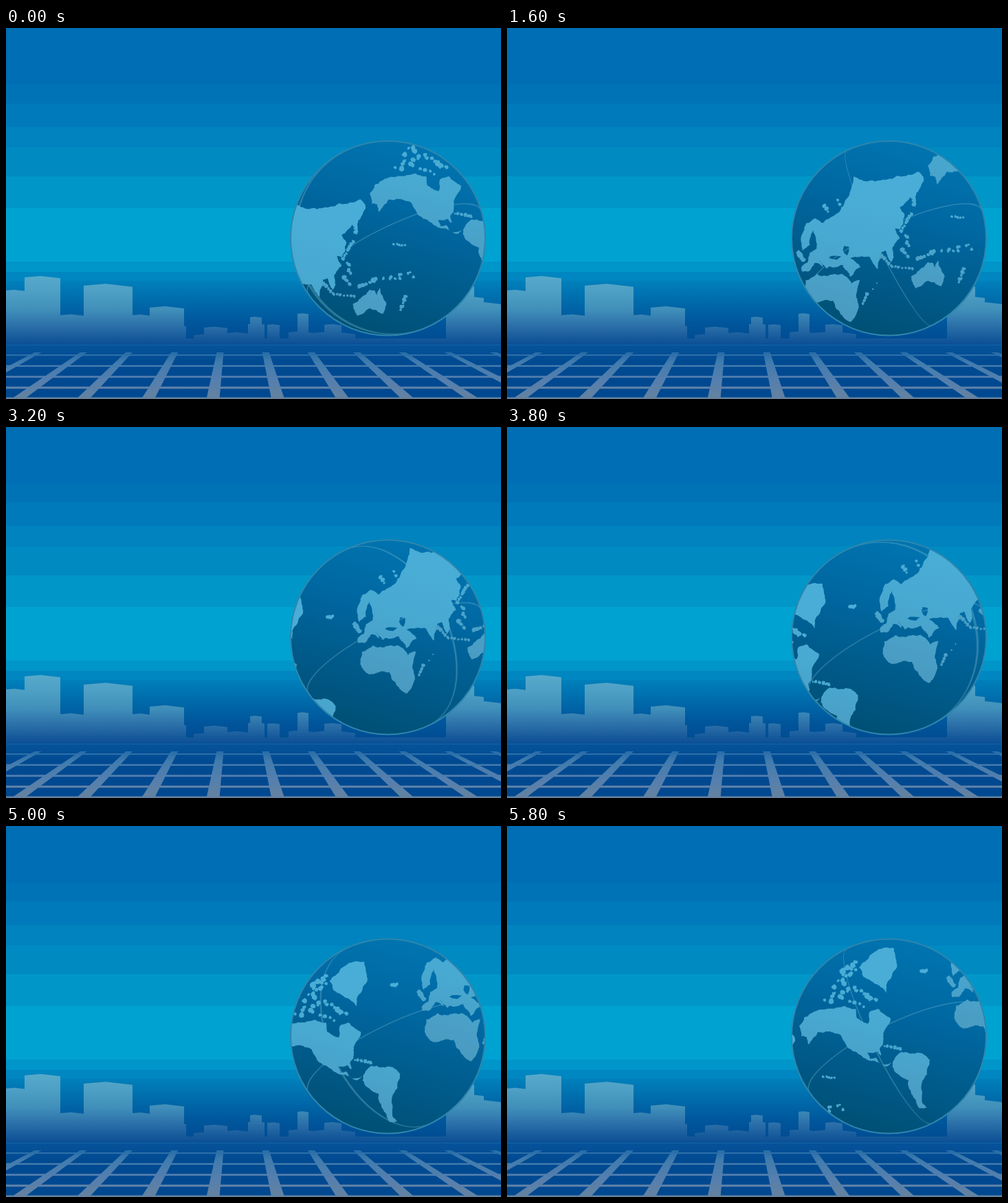
Write an HTML page with a canvas that moves like this. It is 720x540 px and loops after 6 s.

```html
<!DOCTYPE html>
<html lang="en">
<head>
<meta charset="utf-8">
<title>Turning globe</title>
<style>
html, body { margin: 0; width: 100%; height: 100%; overflow: hidden; background: #006eb4; }
canvas { display: block; width: 720px; height: 540px; }
</style>
</head>
<body>
<canvas id="stage" width="720" height="540"></canvas>
<script>
const ctx = document.getElementById('stage').getContext('2d');
const LOOP = 6000, TICK = 200;
const GLOBE = { x: 555.5, y: 306, r: 141.5, tilt: -0.452 };
const STEP = { x: 10.4, y: -5.03 };
const WRAP = 39; // steps for one full turn of the map

let seed = 7;
const rnd = () => (seed = (seed * 16807) % 2147483647) / 2147483647;
const jitter = size => (rnd() * 2 - 1) * size;

function gradient(x0, y0, x1, y1, ...colors) {
  const g = ctx.createLinearGradient(x0, y0, x1, y1);
  colors.forEach((c, i) => g.addColorStop(i / (colors.length - 1), c));
  return g;
}

// Ragged edge from a to b by midpoint displacement
function ragged(path, a, b) {
  const dx = b[0] - a[0], dy = b[1] - a[1], len = Math.hypot(dx, dy);
  if (len < 4) return path.lineTo(...b);
  const off = jitter(Math.min(0.13, 1.8 / len));
  const mid = [(a[0] + b[0]) / 2 - dy * off, (a[1] + b[1]) / 2 + dx * off];
  ragged(path, a, mid);
  ragged(path, mid, b);
}

function coast(path, text) {
  const pts = text.split(' ').map(p => p.split(',').map(Number));
  path.moveTo(...pts[0]);
  pts.forEach((p, i) => ragged(path, p, pts[(i + 1) % pts.length]));
  path.closePath();
}

function islet(path, x, y, rx, ry = rx) {
  const turn = rnd() * 6;
  for (let i = 0; i < 7; i++) {
    const a = turn + i * 2 * Math.PI / 7, d = 1 + jitter(0.3);
    path[i ? 'lineTo' : 'moveTo'](x + rx * d * Math.cos(a), y + ry * d * Math.sin(a));
  }
  path.closePath();
}

// Islands strewn along a line
function chain(path, x0, y0, x1, y1, count, size, spread = 0.7) {
  for (let i = 0; i < count; i++) {
    const f = i / (count - 1);
    islet(path, x0 + (x1 - x0) * f + jitter(spread), y0 + (y1 - y0) * f + jitter(spread),
      size * (1 + jitter(0.35)));
  }
}

// Land masses, each given at the step where its coordinates hold
const lands = [];
function land(step, outline, ...chains) {
  const path = new Path2D(), isles = new Path2D();
  if (outline) coast(path, outline);
  chains.forEach(c => chain(isles, ...c));
  lands.push({ step, path, isles });
  return path;
}

const eurasia = land(12,
  '470,334 471,326 479,321 482,307 492,301 491,289 487,274 482,296 472,304 469,290 477,264 490,257 500,264 ' +
  '519,252 530,240 540,220 546,196 562,203 592,201 610,195 640,189 648,202 637,220 635,241 628,226 ' +
  '613,241 620,252 614,274 606,272 613,286 602,300 604,314 600,321 592,304 586,306 581,331 569,313 ' +
  '548,313 541,315 556,328 541,342 530,325 510,327 506,330 495,318 502,328 489,322 481,334',
  [466, 306, 472, 318, 4, 3.2], [522, 230, 529, 242, 3, 2.6], [504, 238, 508, 247, 3, 2.6]);
islet(eurasia, 519, 314, 8, 3); // inland seas
islet(eurasia, 535, 303, 4, 7);

land(12, // Africa
  '476,347 493,338 506,341 529,338 543,352 555,347 550,366 553,382 548,400 541,408 526,395 516,377 486,380 474,366',
  [565, 367, 559, 381, 4, 2.3], [578, 351, 564, 373, 4, 1.3, 2]);

land(29, // North America
  '425,291 432,279 452,268 490,262 507,266 509,280 525,288 527,271 540,266 558,280 548,300 547,318 542,324 544,334 ' +
  '538,328 524,330 528,339 536,337 545,347 559,344 551,350 520,338 503,328 493,318 486,305 470,299 452,300 438,318 436,307 428,306',
  [549, 320, 573, 324, 6, 2.2], [466, 254, 500, 240, 9, 3.6, 5], [480, 232, 506, 206, 10, 3.4, 4.5],
  [490, 212, 508, 197, 4, 4, 1.5], [505, 235, 535, 254, 8, 4, 2], [500, 254, 520, 262, 4, 2.6, 2]);

land(29, // Greenland
  '512,206 528,188 541,179 563,178 567,206 553,228 552,243 541,232 518,219',
  [603, 211, 610, 211, 3, 3]);

land(29, // South America
  '561,344 573,329 604,331 615,341 611,361 603,375 604,403 611,410 600,411 588,390 584,370 563,356');

land(4, // Australia and the Pacific
  '546,382 570,361 578,362 581,369 585,358 595,382 590,396 570,388 553,399',
  [622, 371, 616, 390, 5, 2.6], [556, 356, 580, 346, 6, 3.4, 1], [533, 343, 541, 352, 3, 3.6],
  [503, 352, 518, 366, 5, 3], [518, 367, 548, 370, 7, 1.8], [538, 320, 543, 336, 4, 2.4, 2],
  [546, 291, 531, 316, 7, 2.8], [547, 262, 550, 277, 4, 2.4], [588, 348, 634, 338, 11, 2, 5],
  [606, 294, 622, 296, 5, 1.8]);

function drawSky() {
  [[0, '#006eb4'], [82, '#0073b7'], [110, '#007aba'], [144, '#0083be'], [174, '#008ac2'],
   [216, '#0097c8'], [262, '#00a2d2'], [340, '#0096c9'], [355, '#0086c0']].forEach(([y, color]) => {
    ctx.fillStyle = color;
    ctx.fillRect(0, y, 720, 540 - y);
  });
  ctx.fillStyle = gradient(0, 368, 0, 462, '#0080bb', '#006aaa', '#00559b', '#004a90');
  ctx.fillRect(0, 368, 720, 172);
}

// Blocks as left, width, roof height
const blocks = [
  [0, 27, 382], [27, 52, 363], [79, 34, 418], [113, 71, 375], [184, 25, 418], [209, 50, 407],
  [259, 3, 434], [273, 50, 447], [288, 34, 436], [322, 30, 444], [352, 24, 431], [355, 17, 421],
  [380, 18, 432], [411, 35, 443], [424, 16, 416], [446, 62, 444], [463, 25, 432],
  [640, 80, 400], [655, 40, 392], [660, 21, 376]
];

function drawCity() {
  ctx.fillStyle = gradient(0, 360, 0, 460, '#58aacb', '#4d9fc4', '#408fba', '#2a6ea8', '#0c4f95');
  ctx.beginPath();
  for (const [x, w, y] of blocks) {
    ctx.moveTo(x, 460);
    ctx.lineTo(x, y);
    ctx.lineTo(x + w * 0.45, y - w / 25);
    ctx.lineTo(x + w, y + w / 40);
    ctx.lineTo(x + w, 460);
  }
  ctx.rect(0, 452, 720, 8);
  ctx.fill();
}

function drawGround() {
  ctx.fillStyle = gradient(0, 460, 0, 540, '#07539a', '#004a92', '#004991', '#004890');
  ctx.fillRect(0, 460, 720, 80);
  ctx.fillStyle = gradient(0, 460, 0, 540, '#1260a3', '#417cae', '#557fae', '#64829f');
  ctx.fillRect(0, 461, 720, 1);
  for (let i = 0; i < 5; i++) ctx.fillRect(0, 537.5 - 15.6 * i, 720, 3.6 - 0.4 * i);
  for (let i = -6; i <= 7; i++) {
    const low = 301 + 94.6 * i, high = 311.5 + 66.2 * i;
    ctx.beginPath();
    ctx.moveTo(high - 5, 472);
    ctx.lineTo(high + 5, 472);
    ctx.lineTo(low + 9.5, 540);
    ctx.lineTo(low - 9.5, 540);
    ctx.fill();
  }
}

// Half width of the moving meridian, negative on the left
function meridian(t) {
  const w = t < 4.2 ? -133 + 73.5 * t - 1.4 * t * t : -143 + 73 * (t - 4.2);
  return Math.max(-140, Math.min(140, w));
}

function drawLines(t) {
  const w = meridian(t), a = Math.abs(w), r = GLOBE.r, half = 0.6 + a * 0.01;
  const side = w < 0 ? [Math.PI / 2, Math.PI * 1.5] : [-Math.PI / 2, Math.PI / 2];
  ctx.save();
  ctx.translate(GLOBE.x, GLOBE.y);
  ctx.rotate(GLOBE.tilt);
  ctx.strokeStyle = ctx.fillStyle = 'rgba(105,175,200,.4)';
  ctx.lineWidth = 1.5;
  ctx.beginPath();
  ctx.ellipse(0, 22, 139.8, 38, 0, Math.PI, 2 * Math.PI);
  ctx.stroke();
  ctx.beginPath();
  ctx.ellipse(0, 0, a + half, r, 0, ...side);
  ctx.ellipse(0, 0, Math.max(0, a - half), r - 1, 0, side[1], side[0], true);
  ctx.fill();
  ctx.restore();
}

function drawLands(step) {
  for (const { step: home, path, isles } of lands) {
    for (let lap = -1; lap <= 1; lap++) {
      const n = step - home + lap * WRAP;
      ctx.save();
      ctx.translate(n * STEP.x, n * STEP.y);
      ctx.fill(path, 'evenodd');
      ctx.fill(isles);
      ctx.restore();
    }
  }
}

function drawGlobe(step) {
  const { x, y, r } = GLOBE;
  const slope = (...colors) => gradient(x + 40, y - r, x - 40, y + r, ...colors);
  ctx.save();
  ctx.beginPath();
  ctx.arc(x, y, r, 0, 2 * Math.PI);
  ctx.clip();
  ctx.fillStyle = slope('#0075b1', '#0068a2', '#005b8b', '#004f74');
  ctx.fillRect(x - r, y - r, 2 * r, 2 * r);
  drawLines(step * TICK / 1000);
  ctx.fillStyle = slope('#49aed8', '#49add6', '#48a8d0', '#4a9dc4', '#4a96ba');
  drawLands(step);
  ctx.restore();
  ctx.beginPath();
  ctx.arc(x, y, r, 0, 2 * Math.PI);
  ctx.strokeStyle = '#2f86ad';
  ctx.lineWidth = 2;
  ctx.stroke();
}

let shown = -1;
function frame() {
  const step = Math.floor(performance.now() % LOOP / TICK);
  if (step !== shown) {
    shown = step;
    drawSky();
    drawCity();
    drawGround();
    drawGlobe(step);
  }
  requestAnimationFrame(frame);
}
frame();
</script>
</body>
</html>
```
